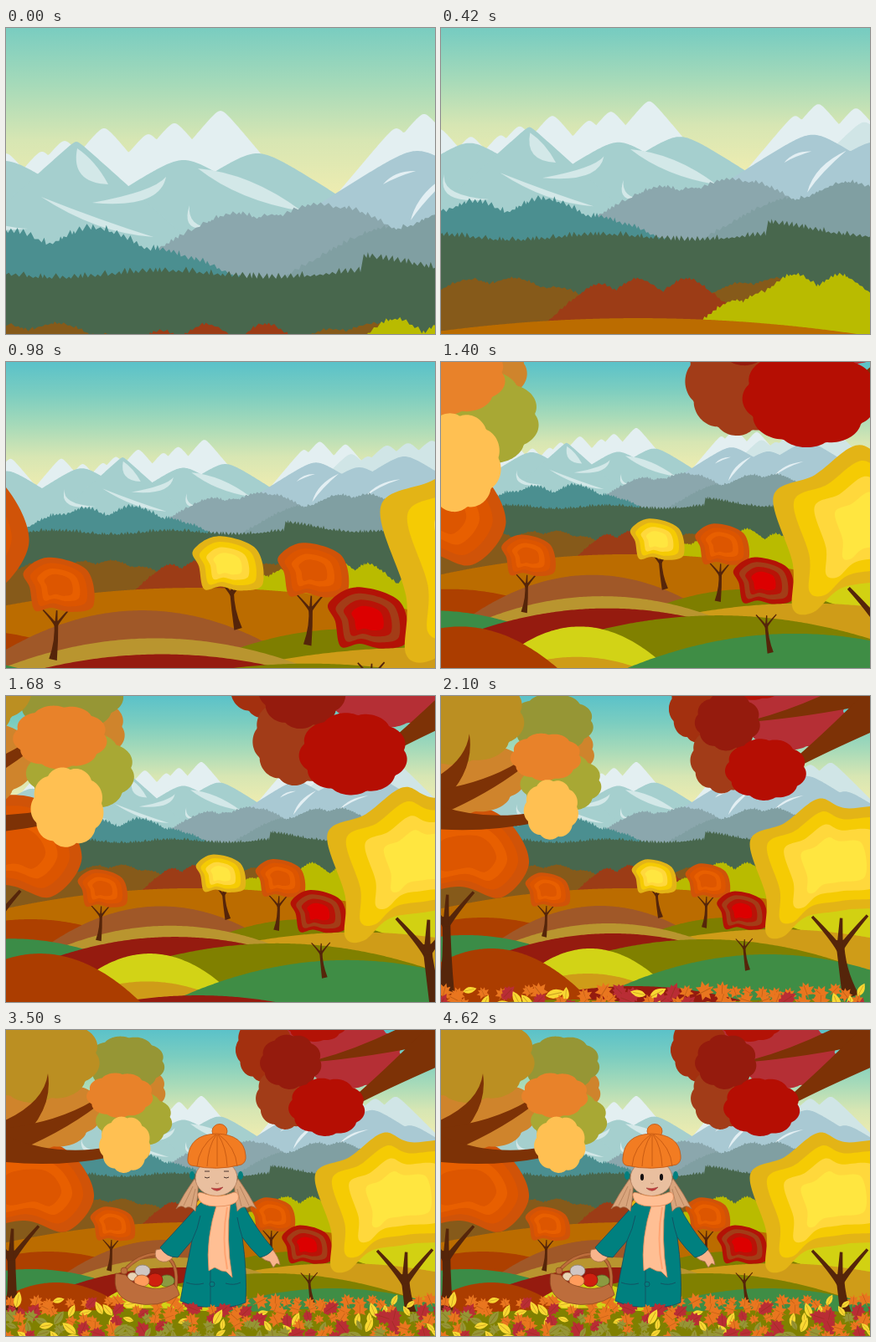
An HTML page with a canvas that plays this animation: 512 by 366 pixels, repeating every 4760 ms.

```html
<!DOCTYPE html>
<html lang="en">
<head>
<meta charset="utf-8">
<title>Autumn valley</title>
<style>
html, body { margin: 0; width: 100%; height: 100%; overflow: hidden; }
canvas { display: block; width: 100%; height: 100%; }
</style>
</head>
<body>
<canvas id="stage" width="512" height="366"></canvas>
<script>
const ctx = document.getElementById('stage').getContext('2d');
const STEP = 140, STEPS = 34;

let seed = 7;
const rnd = () => (seed = (seed * 16807) % 2147483647) / 2147483647;

// Land below the line y = top(x), optionally with foliage tufts
function land(color, top, tuft = 0) {
  const path = new Path2D('M-260 900');
  let tip = false;
  for (let x = -260; x < 860; x += tuft ? 1.5 + rnd() * 4 : 2) {
    path.lineTo(x, top(x) - (tip ? tuft * (.3 + rnd()) : 0));
    tip = !tip && tuft > 0;
  }
  path.lineTo(860, 900);
  return [color, path];
}

// Chain of summits that share one flank slope and one rounding
const ridge = (color, slope, round, summits, tuft) => land(color, x =>
  Math.min(...summits.map(([px, py]) => py + Math.hypot(slope * (x - px), round) - round)), tuft);

// Parabolic hill that falls 30 px at a distance of w
const hill = (color, x, y, w) => land(color, px => y + 30 * ((px - x) / w) ** 2);

// Curved stroke with its own width at the start, the end and the control point
function brush(color, x0, y0, cx, cy, x1, y1, w0 = 0, w1 = 0, mid = (w0 + w1) / 2) {
  const path = new Path2D();
  const side = (x, y, dx, dy, w) => {
    const k = w / 2 / Math.hypot(dx, dy);
    return [x - dy * k, y + dx * k];
  };
  const start = w => side(x0, y0, cx - x0, cy - y0, w);
  const bend = w => side(cx, cy, x1 - x0, y1 - y0, w);
  const end = w => side(x1, y1, x1 - cx, y1 - cy, w);
  path.moveTo(...start(w0));
  path.quadraticCurveTo(...bend(mid), ...end(w1));
  path.lineTo(...end(-w1));
  path.quadraticCurveTo(...bend(-mid), ...start(-w0));
  return [color, path];
}

// Closed Catmull-Rom curve
function blob(color, pts, cx, cy, k) {
  const path = new Path2D(), n = pts.length;
  const at = i => [cx + pts[(i + n) % n][0] * k, cy + pts[(i + n) % n][1] * k];
  path.moveTo(...at(0));
  for (let i = 0; i < n; i++) {
    const [a, b, c, d] = [at(i - 1), at(i), at(i + 1), at(i + 2)];
    path.bezierCurveTo(b[0] + (c[0] - a[0]) / 6, b[1] + (c[1] - a[1]) / 6,
      c[0] - (d[0] - b[0]) / 6, c[1] - (d[1] - b[1]) / 6, ...c);
  }
  return [color, path];
}

// Ellipse with shallow scallops
function cloud(color, x, y, rx, ry, n = 9) {
  const path = new Path2D();
  for (let i = 0; i < 180; i++) {
    const a = i * Math.PI / 90, r = .92 + .08 * Math.abs(Math.sin(a * n / 2 + .4)) ** .7;
    path.lineTo(x + Math.cos(a) * rx * r, y + Math.sin(a) * ry * r);
  }
  return [color, path];
}

const skyFill = ctx.createLinearGradient(0, -64, 0, 200);
['#5bc2c9', '#7bcdc0', '#a6dab9', '#d7e6b3', '#eeecb0'].forEach((c, i) => skyFill.addColorStop(i / 4, c));

const snow = '#d3e8e8', ice = '#e3eff3';
const far = [
  [skyFill, new Path2D('M-400 -400H1000V420H-400Z')],
  ridge('#e3eff1', 1.2, 7, [[-152, 139], [-45, 139], [0, 150], [43, 148], [70, 135], [117, 120], [170, 127], [201, 114],
    [256, 99], [466, 120], [499, 103], [553, 109]]),
  ridge('#d0e5e6', 1, 9, [[565, 129], [601, 134], [641, 111], [685, 106], [735, 101]]),
  ridge('#a5cfce', .65, 14, [[-160, 165], [-2, 159], [212, 158], [300, 150]]),
  ridge('#a5cfce', .9, 3, [[84, 136]]),
  ridge('#a9c9d3', .65, 14, [[491, 147], [582, 157], [677, 134], [770, 172]]),
  brush(snow, 85, 144, 92, 172, 122, 187, 0, 0, 40),
  brush(snow, 42, 202, 111, 238, 176, 250, 0, 0, 16),
  brush(snow, 103, 209, 180, 206, 191, 178, 0, 0, 22),
  brush(snow, 229, 168, 285, 190, 353, 219, 0, 0, 36),
  brush(snow, 219, 212, 212, 242, 246, 239, 0, 0, 12),
  brush(snow, -38, 203, -48, 242, 26, 240, 0, 0, 16),
  brush(ice, 450, 187, 465, 174, 489, 171, 0, 0, 8),
  brush(ice, 483, 230, 498, 196, 539, 170, 0, 0, 14),
  brush(ice, 594, 220, 620, 192, 668, 182, 0, 0, 10),
  ridge('#8ba7ad', .6, 16, [[275, 223], [320, 224], [372, 212], [400, 216]], 4),
  ridge('#809fa2', .6, 16, [[455, 240], [490, 237], [541, 216], [600, 215], [690, 240], [790, 243]], 4),
  ridge('#4b8f90', .6, 16, [[-200, 264], [-50, 258], [5, 245], [105, 241], [180, 266], [215, 277]], 6),
  land('#48674d', x => 296 + 4 * Math.sin(x / 40) - (x > 425 ? 18 * Math.exp((425 - x) / 120) : 0), 6),
  ridge('#865a1a', .6, 16, [[-180, 359], [-90, 357], [0, 356], [60, 354], [120, 367], [390, 361], [440, 354]], 3),
  ridge('#9c3c16', .9, 16, [[185, 363], [240, 355], [310, 355]], 3),
  ridge('#b9bb00', .9, 16, [[380, 386], [420, 374], [465, 349], [530, 350], [600, 362], [700, 382], [800, 395]], 4),
  hill('#bb6c00', 240, 411, 360)
];

const orange = ['#d05308', '#dc5500', '#e85f00', '#dd5600'];
const yellow = ['#e3b416', '#f5cb04', '#ffd83c', '#ffe640'];
const red = ['#b31206', '#a33c17', '#b81307', '#dc0000'];
const crown = (pts, colors, x, y, k = 1) => colors.map((c, i) => blob(c, pts, x, y, k * (1 - i * .2)));

function trunk(x, y, forkX, forkY, spread) {
  const bark = '#55250a', w = spread * .34;
  const limb = (dx, dy) => brush(bark, forkX, forkY + w, forkX + dx * .3, forkY - w * .3, forkX + dx, forkY + dy, w * .7, w * .3);
  return [
    brush(bark, x, y, forkX + w * .2, (y + forkY) / 2, forkX, forkY, w * 1.8, w * .9, w * .6),
    limb(-spread, -spread * .85), limb(spread, -spread * .9), limb(spread * .05, -spread * .8)
  ];
}

const lobes = [[-41, -16], [-12, -33], [34, -18], [42, 24], [16, 32], [-8, 27], [-28, 30], [-34, 3]];
const tree = (x, y, colors, baseX, baseY, k = .63) => [
  ...trunk(baseX, baseY, baseX + (x - baseX) * .6, baseY - 29, 10),
  ...crown(lobes, colors, x, y, k)
];

const mid = [
  hill('#ad4000', 50, 265, 120),
  hill('#a05828', 190, 251, 103),
  hill('#d2d112', 560, 236, 182),
  hill('#7e7e00', 345, 265, 119),
  hill('#cf9c18', 400, 279, 193),
  hill('#b9952f', 200, 272, 133),
  hill('#3b8c47', 30, 286, 126),
  hill('#951b0f', 205, 284, 150),
  hill('#808000', 315, 291, 170),
  hill('#d2d316', 178, 302, 74),
  hill('#cf9c18', 175, 332, 100),
  hill('#3f8d45', 390, 309, 155),
  hill('#951b0f', 230, 347, 170),
  hill('#ab3d00', 60, 302, 82),
  ...tree(127, 232, orange, 123, 288),
  ...tree(254, 216, yellow, 262, 265),
  ...tree(318, 221, orange, 314, 277),
  ...tree(359, 257, red, 366, 328, .71),
  ...trunk(6, 356, 6, 264, 33),
  ...crown([[-100, -40], [-10, -59], [40, -40], [65, 10], [32, 51], [-18, 38], [-100, 45]], orange, 40, 190),
  ...trunk(489, 360, 476, 292, 33),
  ...crown([[-101, -27], [-60, -48], [-20, -77], [12, -66], [80, -60], [90, 40], [12, 56], [-34, 64], [-62, 88], [-82, 84], [-82, 40]],
    yellow, 470, 200)
];

const wood = '#7d3206';
const boughs = [
  cloud('#cf842c', 150, 72, 41, 33),
  cloud('#cf842c', 38, 98, 76, 46),
  cloud('#969635', 143, 40, 47, 33),
  cloud('#bb8f22', 35, 32, 78, 55),
  brush(wood, -40, 145, 52, 108, 50, 52, 44, 0, 22),
  brush(wood, -40, 142, 50, 126, 106, 88, 44, 8, 16),
  brush(wood, -40, 130, 40, 162, 124, 146, 44, 12, 14),
  cloud('#a8a834', 153, 107, 46, 34),
  cloud('#e8822a', 136, 78, 40, 27),
  cloud('#ffc052', 142, 137, 31, 34),
  cloud('#b52f35', 318, 22, 44, 34),
  cloud('#b52f35', 414, 30, 60, 40),
  cloud('#b31206', 370, -6, 36, 20),
  brush(wood, 600, -40, 470, 20, 370, 37, 70, 2, 20),
  brush(wood, 600, -40, 476, 45, 418, 84, 90, 10, 26),
  cloud('#a3300f', 308, 22, 34, 40),
  cloud('#a23c18', 335, 80, 37, 39),
  cloud('#951b0d', 340, 38, 37, 33),
  cloud('#b50e03', 383, 92, 46, 35)
];

const maple = new Path2D('M0 11L-1 5L-8 7L-6 2L-11 -2L-5 -3L-6 -8L-2 -6L0 -11L2 -6L6 -8L5 -3L11 -2L6 2L8 7L1 5Z');
const serrated = new Path2D('M0 13L-6 9L-5 6L-9 4L-7 1L-10 -3L-6 -4L-6 -8L-3 -7L0 -13L3 -7L6 -8L6 -4L10 -3L7 1L9 4L5 6L6 9Z');
const oval = new Path2D('M0 11Q-10 2 0 -11Q10 2 0 11Z');
const kinds = [[maple, '#e9761f'], [serrated, '#b92d35'], [oval, '#f9d832'], [maple, '#e9761f'], [maple, '#969635'], [oval, '#969635']];
const leaves = Array.from({ length: 185 }, (_, i) => {
  const row = Math.floor(i / 37);
  return {
    x: -20 + (i % 37) * 15 + rnd() * 12,
    y: 322 + row * 10 + rnd() * 7,
    turn: (rnd() - .5) * 2.8,
    size: .6 + rnd() * .35,
    kind: kinds[Math.floor(rnd() * (row < 2 ? 4 : 6))]
  };
});

function drawLeaves(list) {
  for (const { x, y, turn, size, kind: [path, color] } of list) {
    ctx.save();
    ctx.translate(x, y);
    ctx.rotate(turn);
    ctx.scale(size, size);
    ctx.fillStyle = color;
    ctx.fill(path);
    ctx.fillStyle = 'rgba(110,50,0,.35)';
    ctx.fillRect(-.4, -7, .8, 16);
    ctx.restore();
  }
}

const paint = items => items.forEach(([color, path]) => { ctx.fillStyle = color; ctx.fill(path); });

function ink(d, fill, line, width = .8) {
  const path = new Path2D(d);
  if (fill) { ctx.fillStyle = fill; ctx.fill(path); }
  if (line) { ctx.strokeStyle = line; ctx.lineWidth = width; ctx.stroke(path); }
}
function disc(x, y, rx, ry, fill, line) {
  ctx.beginPath();
  ctx.ellipse(x, y, rx, ry, 0, 0, 7);
  ctx.fillStyle = fill;
  ctx.fill();
  if (line) { ctx.strokeStyle = line; ctx.lineWidth = .8; ctx.stroke(); }
}

function drawBasket() {
  const edge = '#8f4a20', fill = '#bd6d3c', handle = 'M141 288Q160 266 186 268Q208 276 202 312';
  ink(handle, null, edge, 4);
  ink(handle, null, fill, 2.6);
  disc(163, 288, 9, 7, '#cfc6c4', '#8d7f7a');
  disc(192, 300, 9, 7, '#8b9a40', '#5b6f2c');
  disc(151, 295, 6, 5, '#e9d3b5', '#9d7a55');
  disc(178, 299, 9, 8, '#cf200f', '#8b1409');
  disc(162, 300, 9, 7, '#ff9c5c', '#a9653a');
  ink('M131 291Q126 318 150 326Q182 334 207 317Q205 308 200 304Q184 313 165 307Q150 304 143 293Z', fill, edge);
  disc(141, 288, 4, 4, fill, edge);
}

function drawHead(tilt, closed) {
  const hair = '#d9a57d', hairLine = '#a36f4c', hatLine = '#bf5410';
  ctx.save();
  ctx.translate(252, 200);
  ctx.rotate(tilt);
  ctx.translate(-252, -200);
  for (const side of [-1, 1]) {
    ctx.save();
    ctx.translate(251, 0);
    ctx.scale(side, 1);
    ink('M26 178Q39 196 48 214Q42 208 37 213Q31 209 25 217Q21 195 22 184Z', hair, hairLine);
    ink('M28 187L39 210M25 190L30 211', null, hairLine, .6);
    disc(29, 174, 3, 5, '#00807f');
    ctx.restore();
  }
  disc(251, 177, 25, 21.5, '#e9bf9f', '#b07c5c');
  for (const x of [240, 263]) {
    if (closed) ink(`M${x - 3} 176Q${x} 178 ${x + 3} 176M${x - 3} 169H${x + 3}`, null, '#4a352e', 1);
    else disc(x, 176, 2.1, 4, '#140f10');
  }
  ink('M250 183Q252 185 254 183', null, '#b07c5c');
  ink('M245 189Q252 191 259 188Q252 196 245 189Z', '#c33b3b', '#8f2a2a', .5);
  disc(255, 121, 9, 8.5, '#f27c22', hatLine);
  ink('M217 153Q219 125 251 124Q284 125 286 150Q287 158 281 161Q252 169 221 162Q216 160 217 153Z', '#f27c22', hatLine);
  for (let i = -2; i <= 2; i++)
    ink(`M${252 + i} 125Q${252 + i * 11} 140 ${252 + i * 12} 163`, null, hatLine);
  ctx.restore();
}

function drawGirl(drop, tilt, closed) {
  const dark = '#174a5e', skin = '#f8b48b', skinLine = '#a8714f', knit = '#ffbf94', knitLine = '#e08a58';
  ctx.save();
  ctx.translate(0, drop);
  drawBasket();
  ink('M179 263Q176 272 183 276Q192 280 199 272L190 261Z', skin, skinLine);
  ink('M303 270L317 261Q326 272 327 281L323 279L319 284L315 277Q308 276 303 270Z', skin, skinLine);
  ink(`M232 207Q210 232 184 260Q191 272 205 272Q213 262 222 252Q214 290 208 324Q228 333 250 331Q270 333 286 326
    Q288 290 282 248Q292 262 303 272Q313 270 319 262Q298 238 283 208Q257 196 232 207Z`, '#00807f', dark);
  ink('M222 252Q229 238 232 222M282 248Q278 236 276 224M244 286V331M215 302Q226 306 236 303M262 303Q272 306 280 302', null, dark);
  disc(246, 304, 3, 3, '#00807f', dark);
  ink('M252 207Q238 250 242 288L249 284L257 288L263 289L270 296Q262 250 268 205Z', knit, knitLine);
  ink('M264 212Q257 250 264 286', null, '#ffa472', 2);
  drawHead(tilt, closed);
  ink('M229 198Q228 193 235 195Q253 203 272 194Q279 194 277 203Q272 211 252 211Q230 211 229 198Z', knit, knitLine);
  ctx.restore();
}

// Camera: [step, scale, vertical offset] around a fixed x
const tracks = {
  far: [211.5, [[0, 1, 0], [3, .831, 5.5], [7, .567, 37], [10, .484, 31]]],
  mid: [236.5, [[3, 2.1, -30], [7, 1.59, -102], [10, 1.21, -49], [15, 1, 0]]],
  boughs: [307, [[7, 2.6, -460], [10, 1.75, -120], [15, 1.063, -10], [16, 1, 0]]],
  leaves: [235, [[10, 1.8, -100], [15, 1.165, -25], [18, 1, 0]]]
};

// Monotone cubic interpolation of one key column
function ease(keys, col, t) {
  const last = keys.length - 1;
  if (t <= keys[0][0]) return keys[0][col];
  if (t >= keys[last][0]) return keys[last][col];
  const i = keys.findIndex(k => k[0] > t) - 1;
  const slope = j => (keys[j + 1][col] - keys[j][col]) / (keys[j + 1][0] - keys[j][0]);
  const tangent = j => {
    if (j === 0) return slope(0);
    if (j === last) return slope(last - 1);
    const a = slope(j - 1), b = slope(j);
    return a * b <= 0 ? 0 : 2 * a * b / (a + b);
  };
  const h = keys[i + 1][0] - keys[i][0], u = (t - keys[i][0]) / h, v = 1 - u;
  return keys[i][col] * v * v * (1 + 2 * u) + keys[i + 1][col] * u * u * (3 - 2 * u)
    + h * (tangent(i) * u * v * v - tangent(i + 1) * u * u * v);
}

function layer(name, step, draw) {
  const [cx, keys] = tracks[name], s = ease(keys, 1, step);
  ctx.setTransform(s, 0, 0, s, cx * (1 - s), ease(keys, 2, step));
  draw();
  ctx.setTransform(1, 0, 0, 1, 0, 0);
}

const litter = land('#808000', x => 335 + 2 * Math.sin(x / 35));
const backLeaves = leaves.filter(l => l.y < 331), frontLeaves = leaves.filter(l => l.y >= 331);

function render(step) {
  layer('far', step, () => paint(far));
  layer('mid', step, () => paint(mid));
  layer('boughs', step, () => paint(boughs));
  layer('leaves', step, () => drawLeaves(backLeaves));
  if (step > 16) {
    const drop = 260 * Math.pow(Math.max(0, 25 - step) / 9, 1.363);
    const tilt = step > 25 ? .04 * Math.sin((step - 25) / 8 * Math.PI * 2) : 0;
    drawGirl(drop, tilt, step === 25);
  }
  layer('leaves', step, () => { paint([litter]); drawLeaves(frontLeaves); });
}

function tick() {
  render(Math.floor(performance.now() / STEP) % STEPS);
  requestAnimationFrame(tick);
}
tick();
</script>
</body>
</html>
```
